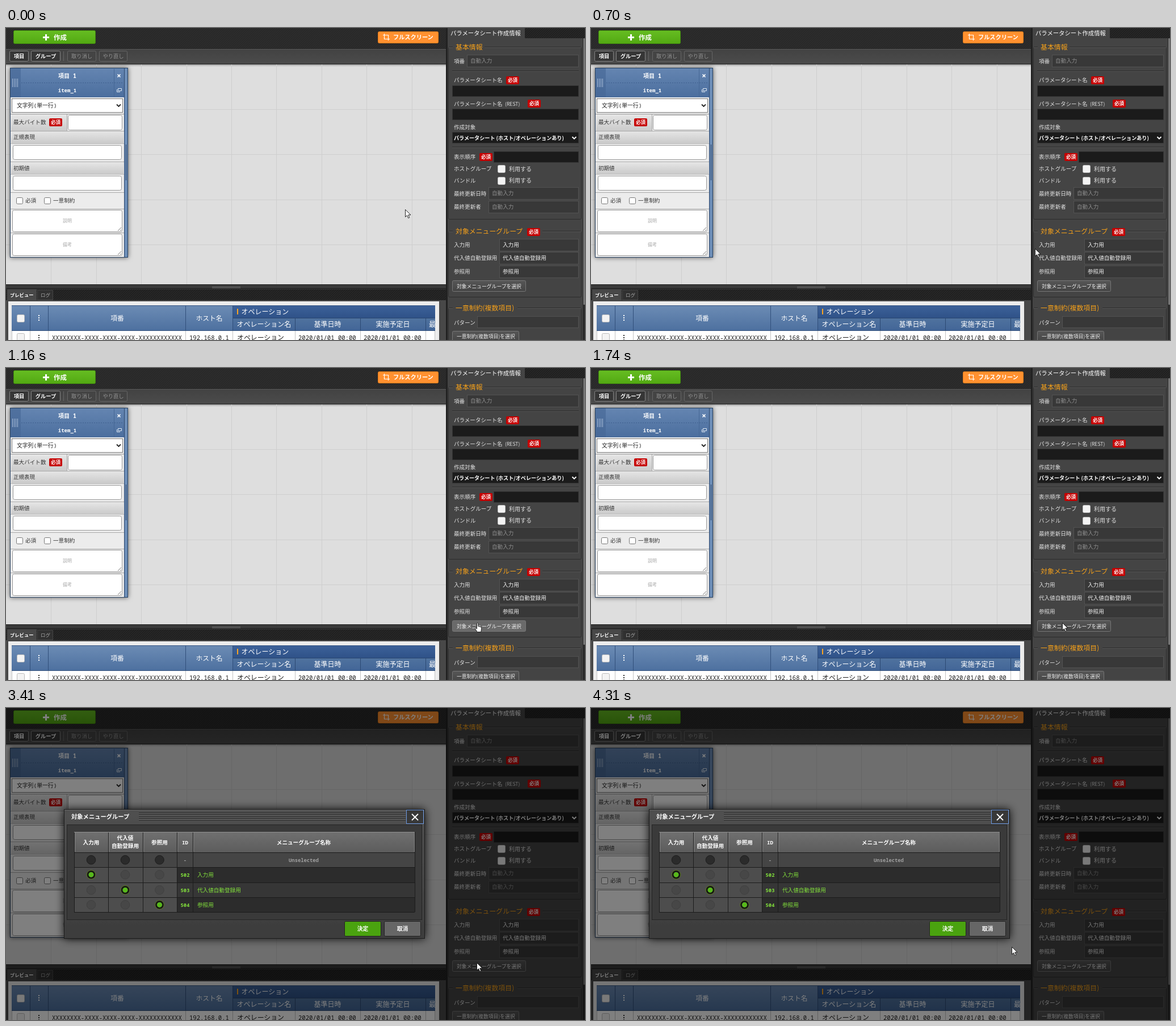
An HTML page for the animation above (5.46 s loop, 1020 px wide and 549 px high).

```html
<!DOCTYPE html>
<html lang="ja">
<head>
<meta charset="utf-8">
<style>
html, body { margin: 0; width: 100%; height: 100%; overflow: hidden; background: #444; }
svg { display: block; width: 1020px; height: 549px; }
text { font-family: "Noto Sans CJK JP", "Noto Sans CJK", "Noto Sans", sans-serif; white-space: pre; }
.mono { font-family: "Noto Sans Mono", "Noto Sans CJK JP", "Noto Sans CJK", monospace; }
</style>
</head>
<body>
<svg id="stage" viewBox="0 0 1020 549" xmlns="http://www.w3.org/2000/svg"></svg>
<script>
const LOOP = 5460;
const ORANGE = '#f5a01a', PALE = '#e2e2e2', GREEN = '#83e23c';

// Boxes are given by their edges: left, top, right, bottom.
const box = (l, t, r, b, fill, stroke, rx = 0, extra = '') => stroke
  ? `<rect x="${l + .5}" y="${t + .5}" width="${r - l - 1}" height="${b - t - 1}" rx="${rx}" fill="${fill}" stroke="${stroke}" ${extra}/>`
  : `<rect x="${l}" y="${t}" width="${r - l}" height="${b - t}" rx="${rx}" fill="${fill}" ${extra}/>`;
const text = (x, y, s, size, fill = PALE, o = {}) =>
  `<text x="${x}" y="${y}" font-size="${size}" fill="${fill}"${o.mid ? ' text-anchor="middle"' : ''}` +
  `${o.bold ? ' font-weight="700"' : ''}${o.mono ? ' class="mono"' : ''}>${s}</text>`;
const mid = (x, y, s, size, fill, o = {}) => text(x, y, s, size, fill, { ...o, mid: true });
const path = (d, stroke, w = 1, extra = '') => `<path d="${d}" fill="none" stroke="${stroke}" stroke-width="${w}" ${extra}/>`;
const hline = (x1, x2, y, c, extra) => path(`M${x1} ${y + .5}H${x2}`, c, 1, extra);
const vline = (x, y1, y2, c, extra) => path(`M${x + .5} ${y1}V${y2}`, c, 1, extra);
const range = n => [...Array(n).keys()];
const badge = (x, y) => box(x, y, x + 23, y + 14, '#c60000', null, 2) +
  mid(x + 11.5, y + 10.3, '必須', 8.6, '#fff', { bold: true });
const check = (x, y, s = 14) => box(x, y, x + s, y + s, s > 12 ? '#f3f3f3' : '#fff', s > 12 ? '#bbb' : '#777', 2);
const grad = (id, a, b) => `<linearGradient id="${id}" x2="0" y2="1"><stop stop-color="${a}"/><stop offset="1" stop-color="${b}"/></linearGradient>`;
const shadow = (id, blur, opacity) => `<filter id="${id}" x="-15%" y="-20%" width="130%" height="140%"><feDropShadow dx="0" dy="0" stdDeviation="${blur}" flood-opacity="${opacity}"/></filter>`;

const defs = `<defs>
  ${grad('green', '#66bd22', '#52a812')}${grad('blue', '#6485b1', '#4b6e9e')}${grad('head', '#6c8cb5', '#4d709f')}
  ${grad('navy', '#3d629a', '#2f5288')}${grad('sub', '#50739f', '#426597')}${grad('label', '#e6e6e6', '#cacaca')}
  ${grad('tool', '#424242', '#4c4c4c')}${grad('button', '#565656', '#444')}${grad('shade', '#777', '#ddd')}
  ${grad('modal', '#505050', '#3c3c3c')}${grad('th', '#707070', '#5c5c5c')}
  <pattern id="stripe" width="4" height="4" patternUnits="userSpaceOnUse">
    <rect width="4" height="4" fill="#202020"/><path d="M-1 1L1 -1M0 4L4 0M3 5L5 3" stroke="#2d2d2d"/>
  </pattern>
  ${shadow('cardShadow', 4, .6)}${shadow('modalShadow', 8, .9)}
</defs>`;

function topBar() {
  let s = box(0, 0, 776, 37, '#303030') + box(0, 0, 776, 37, 'url(#stripe)', null, 0, 'opacity=".45"');
  s += box(13, 4, 158, 28, 'url(#green)', '#418c0d', 2);
  s += path('M65 16.5H76M70.5 11V22', '#fff', 3) + text(84, 20.5, '作成', 11.5, '#fff', { bold: true });
  s += box(655, 6, 762, 27, '#ff9130', '#e87c18', 2);
  s += path('M666.5 10V19.5H676M664 12.5H673.5V22', '#fff', 1.2) + text(682, 20.3, 'フルスクリーン', 10.2, '#fff', { bold: true });
  s += box(0, 37, 776, 64, 'url(#tool)') + hline(0, 776, 37, '#5a5a5a') + hline(0, 776, 63, '#222');
  [[6, 40, '項目', 1], [44, 96, 'グループ', 1], [108, 159, '取り消し', 0], [164, 214, 'やり直し', 0]].forEach(([l, r, label, on]) => {
    s += box(l, 40, r, 59, on ? '#363636' : '#444', on ? '#858585' : '#666', 2);
    s += mid((l + r) / 2, 53, label, 9.3, on ? '#fff' : '#929292', { bold: on });
  });
  return s + vline(101, 41, 58, '#666');
}

function grid() {
  let s = box(0, 64, 776, 451, '#dedede') + box(0, 64, 776, 68, 'url(#shade)', null, 0, 'opacity=".6"');
  range(9).forEach(i => s += vline(Math.round(79.4 * (i + 1)), 64, 451, '#cecece'));
  range(4).forEach(i => s += hline(0, 776, Math.round(63.5 + 79.4 * (i + 1)), '#cecece'));
  return s;
}

function card() {
  let s = box(7, 70, 215, 404, '#6d8eb8', '#273f61', 0, 'filter="url(#cardShadow)"');
  s += box(8, 71, 208, 122, 'url(#blue)') + box(8, 71, 26, 122, '#456795', null, 0, 'opacity=".6"');
  range(4).forEach(i => s += vline(11 + i * 3, 89, 104, '#a9bdd8'));
  s += hline(27, 207, 96, '#3f608f', 'stroke-dasharray="2 2"') + vline(190, 72, 121, '#456795');
  s += mid(108, 87.5, '項目 1', 10, '#fff', { bold: true, mono: true }) + mid(108, 112.5, 'item_1', 9, '#fff', { bold: true, mono: true });
  s += path('M196.5 81.5L201.5 86.5M201.5 81.5L196.5 86.5', '#fff', 1.6);
  s += path('M197.5 106.5H203.5V110.5H197.5ZM195.5 108V112.5H201', '#dce6f2');
  s += box(8, 122, 208, 403, '#ececec') + vline(208, 71, 403, '#2c466b') + vline(211, 205, 268, '#263d5c');
  s += box(10, 124, 206, 149, '#fff', '#777') + text(19, 139.5, '文字列(単一行)', 9.8, '#222', { mono: true });
  s += path('M195 134.5L198.5 138L202 134.5', '#222', 1.8);
  s += box(9, 152, 207, 181, '#ededed') + box(9, 152, 107, 181, 'url(#label)') + vline(107, 152, 181, '#aaa') + hline(8, 208, 151, '#999');
  s += text(13, 169.3, '最大バイト数', 9.6, '#333') + badge(76, 159);
  s += box(9, 181, 207, 203, 'url(#label)') + hline(8, 208, 181, '#aaa') + hline(8, 208, 203, '#bbb');
  s += text(13, 195.3, '正規表現', 9.5, '#333');
  s += box(9, 236, 207, 257, 'url(#label)') + hline(8, 208, 235, '#aaa') + hline(8, 208, 257, '#bbb');
  s += text(13, 249.8, '初期値', 9.5, '#333');
  [[109, 153, 205, 180], [12, 206, 204, 232], [12, 260, 204, 286]].forEach(b => s += box(...b, '#fff', '#999', 3));
  s += hline(8, 208, 289, '#aaa') + hline(8, 208, 318, '#aaa');
  s += check(18, 298, 12) + text(34, 307, '必須', 9.6, '#333') + check(67, 298, 12) + text(83, 307, '一意制約', 9.6, '#333');
  [[320, '説明'], [362, '備考']].forEach(([y, label]) => {
    s += box(11, y, 205, y + 39, '#fff', '#999', 3) + mid(108, y + 22, label, 8, '#c4c4c4', { bold: true });
    s += path(`M197 ${y + 37}L203 ${y + 31}M201 ${y + 37}L203 ${y + 35}`, '#777');
  });
  return s + hline(8, 208, 360, '#aaa');
}

function preview() {
  let s = box(0, 451, 776, 460, '#3a3a3a') + hline(0, 776, 451, '#1c1c1c') + hline(0, 776, 458, '#1c1c1c');
  s += hline(363, 413, 455, '#666') + hline(363, 413, 457, '#666');
  s += box(0, 460, 776, 479, 'url(#stripe)') + box(0, 479, 776, 549, '#484848');
  s += box(2, 460, 54, 480, '#484848') + text(7, 473.3, 'プレビュー', 8.3, '#fff', { bold: true });
  s += box(55, 461, 83, 479, '#303030', '#444') + text(61, 473.3, 'ログ', 8.5, '#aaa');
  s += box(4, 481, 763, 549, '#ececec');
  const cells = [[10, 43], [43, 75], [75, 317], [317, 400]];
  cells.forEach(([l, r]) => s += box(l, 488, r, 533, 'url(#head)') + vline(r - 1, 488, 533, '#314f7b'));
  s += box(400, 488, 756, 510, 'url(#navy)') + box(400, 510, 756, 533, 'url(#sub)') + hline(400, 756, 510, '#2a4670');
  [509, 624, 739].forEach(x => s += vline(x, 510, 533, '#2c4973'));
  s += hline(10, 756, 488, '#365682') + hline(10, 756, 532, '#314f7b') + box(10, 533, 756, 549, '#fff');
  [10, 42, 74, 316, 399, 509, 624, 739, 755].forEach(x => s += vline(x, 533, 549, '#c4c4c4'));
  s += check(19, 504) + check(19, 537);
  [506, 510, 514].forEach(y => s += box(57, y - 1, 59, y + 1, '#fff'));
  [541, 545, 549].forEach(y => s += box(57, y - 1, 59, y + 1, '#333'));
  s += mid(196, 514.5, '項番', 11.8, '#fff') + mid(358, 514.5, 'ホスト名', 11.8, '#fff');
  s += box(407, 494, 409, 504, '#ffa51e') + text(414.5, 503.5, 'オペレーション', 12, '#fff');
  s += mid(454.5, 526, 'オペレーション名', 12, '#fff') + mid(566.5, 526, '基準日時', 12, '#fff') + mid(681.5, 526, '実施予定日', 12, '#fff');
  s += `<svg x="740" y="510" width="16" height="23">${text(5, 16, '最終更新日時', 12, '#fff')}</svg>`;
  const row = (x, v) => text(x, 548.5, v, 10.6, '#222', { mono: true });
  s += row(81, 'XXXXXXXX-XXXX-XXXX-XXXX-XXXXXXXXXXXX') + row(323, '192.168.0.1') + text(407, 548.5, 'オペレーション', 11.9, '#222');
  return s + row(515, '2020/01/01 00:00') + row(630, '2020/01/01 00:00');
}

function fieldset(top, bottom, legend, width) {
  return box(779, top, 1014, bottom, 'none', '#2c2c2c', 2) + hline(780, 1013, top + 1, '#585858') +
    box(787, top - 3, 795 + width, top + 4, '#444') + text(792, top + 5, legend, 11.9, ORANGE);
}

function sidePanel() {
  const label = (y, s) => text(789, y, s, 9.55);
  const dark = (l, t) => box(l, t, 1009, t + 20, '#1b1b1b', '#333');
  const field = (l, t, s, color) => box(l, t, 1009, t + 22, '#383838', '#525252') + text(l + 6, t + 14.2, s, 9.6, color);
  const auto = (l, t) => field(l, t, '自動入力', '#8d8d8d');
  const rule = y => hline(786, 1009, y, '#2b2b2b') + hline(786, 1009, y + 1, '#555');

  let s = box(775, 0, 1020, 549, '#444') + box(775, 0, 778, 549, '#222') + box(778, 0, 1020, 18, 'url(#stripe)');
  s += box(778, 0, 914, 19, '#444') + text(783, 13, 'パラメータシート作成情報', 10.35, '#fff');
  s += fieldset(33, 337, '基本情報', 48);
  s += label(61.5, '項番') + auto(812, 47) + rule(75);
  s += label(95.3, 'パラメータシート名') + badge(881, 85) + dark(786, 101);
  s += label(136.5, 'パラメータシート名') + text(879, 136.5, '(REST)', 8.6) + badge(919, 126) + dark(786, 142);
  s += label(177.5, '作成対象') + dark(786, 183) + text(789, 196.8, 'パラメータシート (ホスト/オペレーションあり)', 9.1, '#fff', { bold: true });
  s += path('M997.5 191.5L1001 195L1004.5 191.5', '#fff', 1.8) + rule(209);
  s += label(230.3, '表示順序') + badge(834, 220) + dark(859, 217);
  s += label(251.3, 'ホストグループ') + check(866, 241) + text(886, 251.5, '利用する', 10);
  s += label(272, 'バンドル') + check(866, 262) + text(886, 272.2, '利用する', 10);
  s += label(294.5, '最終更新日時') + auto(850, 280) + label(318.3, '最終更新者') + auto(850, 304);
  s += fieldset(357, 474, '対象メニューグループ', 150) + badge(918, 352);
  ['入力用', '代入値自動登録用', '参照用'].forEach((name, i) => {
    const y = 371 + i * 23.7 | 0;
    s += label(y + 14.2, name) + field(869, y, name, '#f0f0f0');
  });
  s += `<rect id="pick" x="786.5" y="444.5" width="129" height="19" rx="2" stroke="#777"/>` + text(794, 457.5, '対象メニューグループを選択', 8.8, '#f0f0f0');
  s += fieldset(492, 570, '一意制約(複数項目)', 106) + label(521.5, 'パターン') + box(830, 507, 1009, 528, '#383838', '#525252');
  s += box(786, 533, 904, 553, 'url(#button)', '#777', 2) + text(794, 546.3, '一意制約(複数項目)を選択', 8.8, '#f0f0f0');
  return s + box(1016, 18, 1020, 549, '#2c2c2c') + box(1017, 18, 1020, 487, '#777', null, 1);
}

function radio(x, y, state) {
  const [fill, ring] = { on: ['#161616', '#5d7a22'], off: ['#474747', '#404040'], none: ['#2b2b2b', '#1d1d1d'] }[state];
  const dot = state === 'on' ? `<circle cx="${x}" cy="${y}" r="4.6" fill="#58b81c"/>` : '';
  return `<circle cx="${x}" cy="${y}" r="7.8" fill="${fill}" stroke="${ring}"/>` + dot;
}

function dialog() {
  const cols = [120, 180, 241, 301, 329, 720], centers = [150, 210, 270.5];
  const rowY = i => Math.round(254 + i * 26.3);
  let s = box(102, 178, 738, 406, 'url(#modal)', '#1c1c1c', 0, 'filter="url(#modalShadow)"') + hline(103, 737, 179, '#6a6a6a');
  s += text(115, 195, '対象メニューグループ', 10.3, '#fff', { bold: true });
  range(5).forEach(i => s += hline(234, 704, 184 + i * 3.5 | 0, '#2a2a2a') + hline(234, 704, 185 + i * 3.5 | 0, '#5e5e5e'));
  s += box(705, 179, 736, 204, '#383838', '#6a97e0', 0) + path('M715 186.5L726 197.5M726 186.5L715 197.5', '#fff', 1.8);
  s += box(107, 205, 733, 373, '#3a3a3a', '#242424') + box(120, 218, 720, 254, 'url(#th)');
  range(4).forEach(i => {
    s += box(120, rowY(i), 720, rowY(i + 1), ['#454545', '#2c2c2c', '#363636', '#2c2c2c'][i]);
    if (i) s += box(120, rowY(i), 301, rowY(i + 1), '#4d4d4d');
  });
  range(5).forEach(i => s += hline(120, 720, rowY(i), '#1c1c1c'));
  cols.forEach(x => s += vline(x, 218, 359, '#1c1c1c') + vline(x + (x < 720 ? 1 : -1), 219, 253, '#858585'));
  s += hline(120, 720, 218, '#909090');
  const th = (x, y, t) => mid(x, y, t, 9.6, '#fff', { bold: true });
  s += th(150, 239.5, '入力用') + th(210, 232, '代入値') + th(210, 246, '自動登録用') + th(270.5, 239.5, '参照用');
  s += mid(315.5, 239.5, 'ID', 9.2, '#fff', { bold: true, mono: true }) + th(524.5, 239.5, 'メニューグループ名称');
  range(4).forEach(r => centers.forEach((x, c) => {
    s += radio(x, rowY(r) + 13.3, r === c + 1 ? 'on' : r ? 'off' : 'none');
  }));
  const mono = { bold: true, mono: true };
  s += mid(315.5, 270.5, '-', 8.8, '#aaa', mono) + mid(524.5, 270.5, 'Unselected', 8.8, '#a0a0a0', mono);
  ['入力用', '代入値自動登録用', '参照用'].forEach((name, i) => {
    const y = rowY(i + 1) + 16.8;
    s += mid(315.5, y, 502 + i, 8.8, GREEN, mono) + text(337, y, name, 9.6, GREEN);
  });
  [[596, 661, '#4aa30f', '決定'], [666, 731, '#666', '取消']].forEach(([l, r, fill, label]) => {
    s += box(l, 375, r, 402, fill, '#222', 2) + mid((l + r) / 2, 392, label, 9.8, '#fff', { bold: true });
  });
  return s;
}

const arrow = `<path id="arrow" d="M.5 .5V13.5L3.5 10.7L5.7 15.5L7.8 14.6L5.7 9.9H10Z" fill="#fff" stroke="#111" stroke-width=".9"/>`;
const hand = `<path id="hand" d="M3.5 1.2Q4.7 0 5.8 1.2V6.5L9.5 7.3Q12 8 11.7 10.3L10.7 16.5H4.2L.8 11.2Q.2 9.5 1.7 9.5L3.5 11Z" fill="#fff" stroke="#111" stroke-width=".9"/>`;

const $ = id => document.getElementById(id);
$('stage').innerHTML = defs + topBar() + grid() + card() + preview() + sidePanel() +
  `<g id="modalLayer">${box(0, 0, 1020, 549, '#000', null, 0, 'opacity=".5"')}${dialog()}</g>` + arrow + hand;

const easeOut = (u, power) => 1 - (1 - u) ** power;
const progress = (t, start, steps) => Math.max(0, Math.min(steps, Math.floor((t - start) / 60))) / steps;
const mix = (a, b, u) => Math.round(a + (b - a) * u);

function pointer(t) {
  if (t < 1090) {
    const u = progress(t, 460, 9);
    return [mix(703, 826, easeOut(u, 1.75)), mix(319, 439, easeOut(u, 1.45))];
  }
  if (t < 3410) return t < 1160 ? [829, 446] : [830, 448];
  const u = easeOut(progress(t, 3410, 15), 1.6);
  return [mix(829, 741, u), mix(448, 420, u)];
}

function render(t) {
  const [x, y] = pointer(t);
  const pointing = t >= 1090 && t < 1740;
  $('arrow').setAttribute('transform', `translate(${x} ${y})`);
  $('hand').setAttribute('transform', `translate(${x - 4} ${y})`);
  $('arrow').style.display = pointing ? 'none' : '';
  $('hand').style.display = pointing ? '' : 'none';
  $('pick').setAttribute('fill', t >= 1090 && t < 1620 ? '#6a6a6a' : 'url(#button)');
  $('modalLayer').style.display = t >= 1800 ? '' : 'none';
}

const begin = performance.now();
function tick() {
  render((performance.now() - begin) % LOOP);
  requestAnimationFrame(tick);
}
tick();
</script>
</body>
</html>
```
